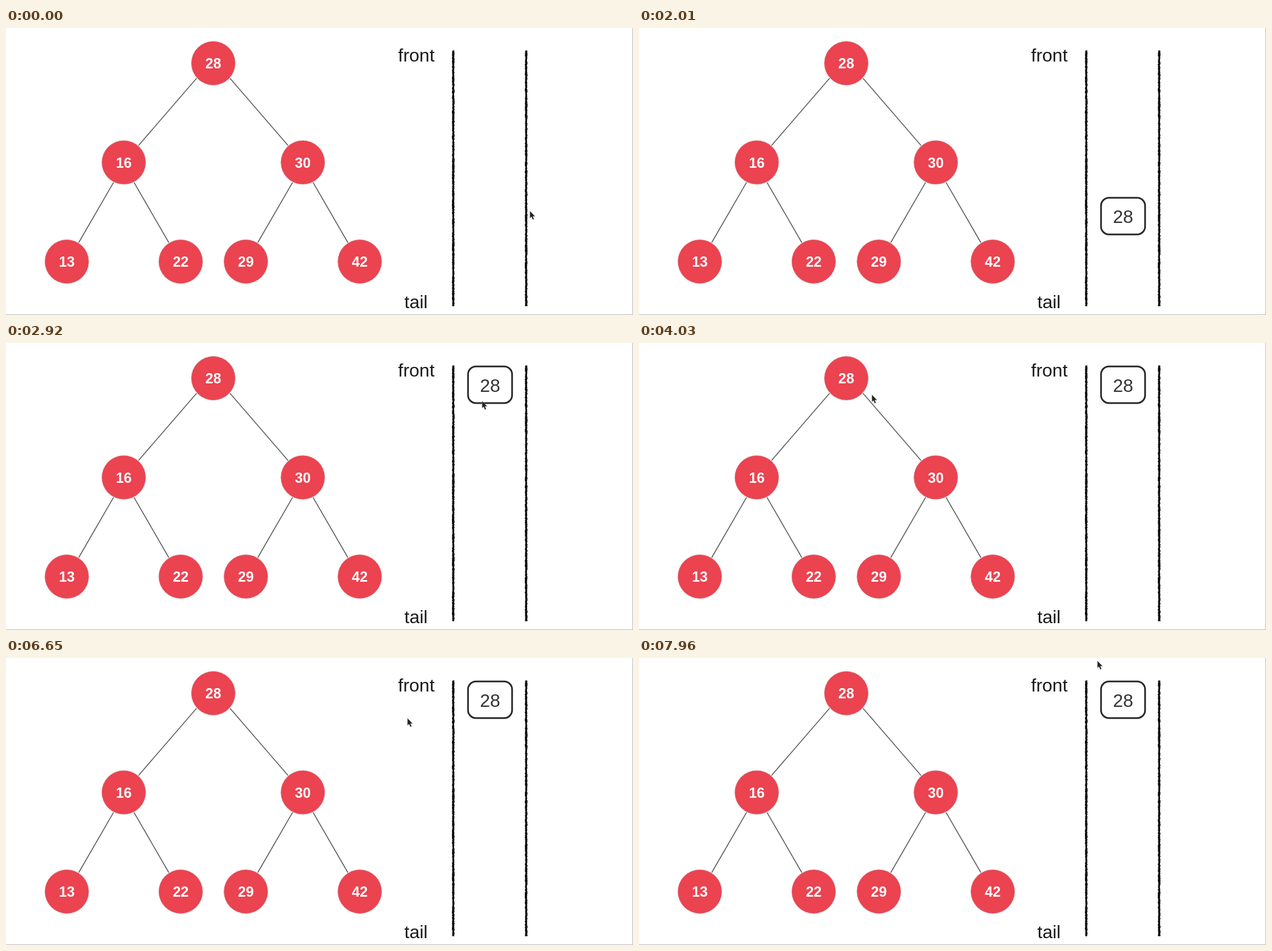
An HTML page that plays this animation: 1101x505 px, repeating every 8000 ms.

```html
<!DOCTYPE html>
<html lang="en">
<head>
<meta charset="utf-8">
<title>Tree traversal with a queue</title>
<style>
  html, body { margin: 0; width: 100%; height: 100%; overflow: hidden; background: #fff; }
  svg { display: block; width: 1101px; height: 505px; font: 32px "Liberation Sans", Arial, sans-serif; }
  .edge { stroke: #606060; stroke-width: 1.7; }
  .node circle { fill: #eb4350; stroke: #cf8d93; stroke-width: .8; }
  .node text { font-size: 25px; font-weight: bold; fill: #fff; text-anchor: middle; }
</style>
</head>
<body>
<svg viewBox="0 0 1101 505">
  <g id="tree"></g>
  <text x="688.5" y="59" fill="#1a1a1a">front</text>
  <text x="699.5" y="493" fill="#1a1a1a">tail</text>
  <g id="rails" fill="#0c0c0c"></g>
  <g id="item">
    <rect x="811.3" y="-32.2" width="77.4" height="64.4" rx="14" fill="#fff" stroke="#2a2a2a" stroke-width="3"/>
    <text x="850" y="12" text-anchor="middle" fill="#333">28</text>
  </g>
  <path id="cursor" d="M0 0V12.5L2.7 10.2 5 15.2 7.2 14.2 5 9.4H9Z" fill="#222" stroke="#aaa" stroke-width=".6"/>
  <path d="M1100.5 0V504.5H0" fill="none" stroke="#b8b8b8"/>
</svg>
<script>
const byId = id => document.getElementById(id);
const LOOP = 8000, TICK = 100.8;

// Binary tree in level order; each edge leaves and meets its circles at a fixed lean
const labels = [28, 16, 30, 13, 22, 29, 42];
const spread = [157.2, 100], leanOut = [48, 27], leanIn = [41, 32];
const nodes = [], edges = [];
const rim = (node, degrees, side) => {
  const a = degrees * Math.PI / 180;
  return `${node.x + side * 39.5 * Math.sin(a)} ${node.y + 39.5 * Math.cos(a)}`;
};
labels.forEach((label, i) => {
  if (!i) return nodes.push({ x: 364, y: 62, level: 0, label });
  const parent = nodes[(i - 1) >> 1], side = i % 2 ? -1 : 1, depth = parent.level;
  const node = { x: parent.x + side * spread[depth], y: parent.y + 174.5, level: depth + 1, label };
  nodes.push(node);
  edges.push(`<path class="edge" d="M${rim(parent, leanOut[depth], side)}L${rim(node, 180 - leanIn[depth], -side)}"/>`);
});
byId('tree').innerHTML = edges.join('') + nodes.map(({ x, y, label }) =>
  `<g class="node"><circle cx="${x}" cy="${y}" r="38.5"/><text x="${x}" y="${y + 9.3}">${label}</text></g>`).join('');

// Charcoal-like vertical strokes with seeded rough edges
let seed = 7;
const random = () => (seed = seed * 16807 % 2147483647) / 2147483647;
function rail(x) {
  const left = [], right = [];
  for (let y = 39.5; y < 490; y += 1.5) {
    left.push(`${x - 1.3 - random() * 1.2} ${y}`);
    right.unshift(`${x + 1.3 + random() * 1.2} ${y}`);
  }
  return `<path d="M${left.concat(right).join('L')}Z"/>`;
}
byId('rails').innerHTML = rail(785.4) + rail(913.4);

// Pointer stops as [tick, x, y]; it leaves and re-enters below the stage
const stops = [[14, 920, 322], [18, 850, 510], [23, 480, 510], [26, 546, 204], [29, 836, 102],
  [31, 836, 102], [40, 409, 91], [44, 300, 74], [50, 855, 19], [53, 811, 132], [56, 879, 119],
  [61, 879, 119], [63, 232, 206], [66, 705, 106], [71, 236, 295], [77, 927, 90], [79, 805, 5]];

function pointerAt(tick) {
  const next = stops.findIndex(stop => stop[0] > tick);
  if (next < 1) return stops.at(next).slice(1);
  const [t0, x0, y0] = stops[next - 1], [t1, x1, y1] = stops[next];
  const f = (tick - t0) / (t1 - t0);
  return [x0 + (x1 - x0) * f, y0 + (y1 - y0) * f];
}

const start = performance.now();
function draw() {
  const tick = Math.floor(((performance.now() - start) % LOOP + 10) / TICK);
  const itemY = Math.max(73.5, 331 - 136 * (tick - 20));
  byId('item').setAttribute('transform', `translate(0 ${itemY})`);
  byId('cursor').setAttribute('transform', `translate(${pointerAt(tick)})`);
  requestAnimationFrame(draw);
}
draw();
</script>
</body>
</html>
```
